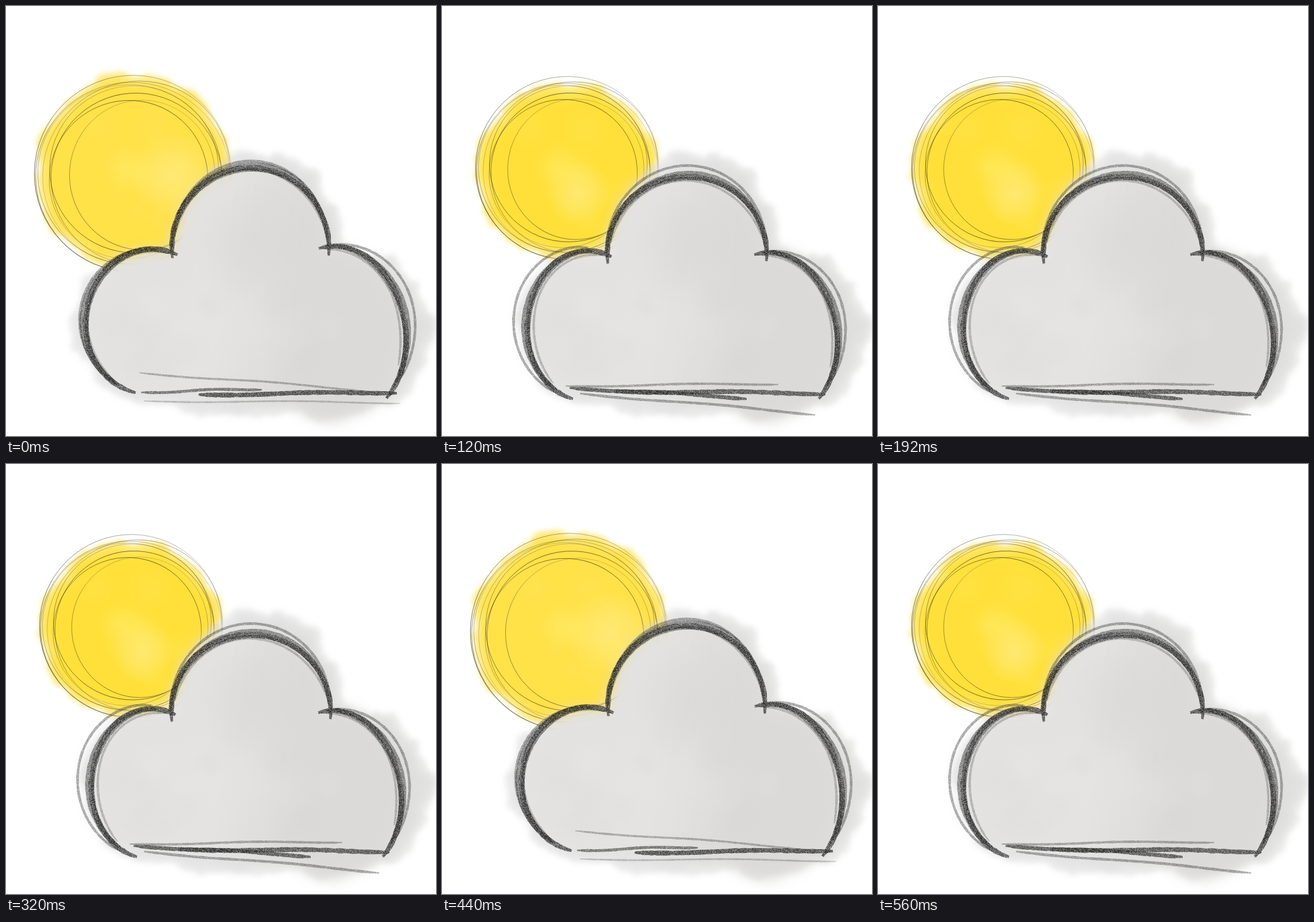
An HTML page with a canvas for the animation above (640 ms loop, 748 by 748 pixels).

```html
<!DOCTYPE html>
<html lang="en">
<head>
<meta charset="utf-8">
<title>Sun and cloud</title>
<style>
html, body { margin: 0; width: 100%; height: 100%; overflow: hidden; background: #fff; }
canvas { display: block; }
</style>
</head>
<body>
<canvas id="stage" width="748" height="748"></canvas>
<script>
const SIZE = 748, { PI, sin, cos, hypot, min, max } = Math;
let seed = 7;

function rand(lo = 0, hi = 1) {
  seed = (seed * 1664525 + 1013904223) >>> 0;
  return lo + (hi - lo) * seed / 4294967296;
}

function layer(size = SIZE) {
  const c = document.createElement('canvas');
  c.width = c.height = size;
  return c.getContext('2d');
}

// Points at(t) for t from 0 to 1.
const sample = (n, at) => Array.from({ length: n + 1 }, (_, i) => at(i / n));

function fillPath(g, pts) {
  g.beginPath();
  pts.forEach(([x, y]) => g.lineTo(x, y));
  g.closePath();
  g.fill();
}

// An ellipse with a ragged edge.
function blot(g, [cx, cy, rx, ry], grow, rough) {
  fillPath(g, sample(130, t => {
    const a = t * 2 * PI;
    const k = grow + rough * (rand(-.5, .5) + .4 * sin(a * 7 + cx) + .3 * sin(a * 13 + cy));
    return [cx + cos(a) * (rx + k), cy + sin(a) * (ry + k)];
  }));
}

function glow(g, x, y, r, rgb, a) {
  const fill = g.createRadialGradient(x, y, 0, x, y, r);
  fill.addColorStop(0, `rgba(${rgb},${a})`);
  fill.addColorStop(.5, `rgba(${rgb},${a * .6})`);
  fill.addColorStop(1, `rgba(${rgb},0)`);
  g.fillStyle = fill;
  g.fillRect(x - r, y - r, 2 * r, 2 * r);
}

function paintSun(g, { body, color, shine }) {
  g.save();
  g.fillStyle = color;
  for (const [grow, alpha, blur] of [[-1, .5, 4], [-8, .6, 7], [-18, 1, 8]]) {
    g.globalAlpha = alpha;
    g.filter = `blur(${blur}px)`;
    blot(g, body, grow, 9);
  }
  g.restore();
  glow(g, ...shine, '255,236,135', .7);
  for (let i = 0; i < 14; i++) {
    const a = rand(0, 2 * PI), r = rand(0, 100);
    glow(g, body[0] + cos(a) * r, body[1] + sin(a) * r, rand(20, 50), '255,236,110', .14);
  }
}

// Pencil circles that drift around the centre and fade along their way.
function paintRings(g, [cx, cy, inner, outer]) {
  const count = 8;
  for (let i = 0; i < count; i++) {
    const r = inner + (outer - inner) * (i / (count - 1)) ** .7;
    const a = i * 2.4, off = (outer - r) * .3 + 3;
    const x = cx + cos(a) * off, y = cy + sin(a) * off;
    const ink = g.createConicGradient(rand(0, 6), x, y), dark = rand(.4, .75);
    [dark, dark * .3, dark].forEach((v, k) => ink.addColorStop(k / 2, `rgba(40,36,20,${v})`));
    g.strokeStyle = ink;
    g.beginPath();
    g.ellipse(x, y, r + rand(-4, 4), r + rand(-4, 4), a, 0, 2 * PI);
    g.stroke();
  }
}

// Watercolour areas: dome, left, right, bottom.
const halo = [[442, 408, 140, 156], [257, 556, 144, 126], [580, 568, 162, 148], [435, 642, 270, 72]];
const fog = [[425, 425, 134, 142], [255, 552, 116, 124], [568, 572, 124, 146], [420, 580, 262, 106]];

function paintWash(g, areas, [left, right], grow, rough, blur, alpha) {
  const p = layer();
  p.fillStyle = p.createLinearGradient(100, 500, SIZE, 560);
  [left, left, right, right].forEach((c, i) => p.fillStyle.addColorStop([0, .42, .62, 1][i], c));
  areas.forEach(area => blot(p, area, grow, rough));
  g.save();
  g.globalAlpha = alpha;
  g.filter = `blur(${blur}px)`;
  g.drawImage(p.canvas, 0, 0);
  g.restore();
}

function paintCloud(g, inset) {
  const rims = halo.map(([x, y, rx, ry], i) =>
    i === 1 ? [x + inset / 2, y, rx - inset / 2, ry] : [x, y, rx, ry]);
  const pale = ['#d6d6d6', '#cfcfce'];
  paintWash(g, rims, pale, 0, 12, 5, .38);
  paintWash(g, rims, pale, -10, 14, 8, .42);
  paintWash(g, fog, ['#e3e2e1', '#dbdad8'], 2, 5, 12, 1);
  glow(g, 430, 410, 100, '215,214,212', .5);
  glow(g, 360, 560, 130, '230,229,228', .55);
  for (let i = 0; i < 24; i++) {
    glow(g, rand(190, 640), rand(470, 640), rand(20, 55),
      rand() < .5 ? '232,231,230' : '212,211,209', .14);
  }
}

const grain = (() => {
  const g = layer(256), img = g.createImageData(256, 256);
  for (let i = 3; i < img.data.length; i += 4) img.data[i] = 150 * rand() ** 2;
  g.putImageData(img, 0, 0);
  return g.canvas;
})();

// A charcoal mark of uneven width.
function mark(g, pts, width, alpha) {
  const left = [], right = [], last = pts.length - 1;
  pts.forEach(([x, y], i) => {
    const [x0, y0] = pts[max(0, i - 1)], [x1, y1] = pts[min(last, i + 1)];
    const half = width / 2 * min(1, .5 + min(i, last - i) / 8) * rand(.88, 1.12);
    const len = hypot(x1 - x0, y1 - y0) || 1;
    const nx = (y0 - y1) / len * half, ny = (x1 - x0) / len * half;
    left.push([x + nx, y + ny]);
    right.unshift([x - nx, y - ny]);
  });
  g.fillStyle = `rgba(30,30,30,${alpha})`;
  fillPath(g, left.concat(right));
}

// Repeated passes over one lobe; "stray" is how far the loosest one swings out.
function sketchLobe(g, [cx, cy, rx, ry, stray], [from, to]) {
  const passes = [[9, .74, 0], [6, .55, -4], [6, .5, 5], [4.5, .42, stray], [4, .28, -stray * .6]];
  passes.forEach(([width, alpha, swing], i) => {
    const start = i ? rand(0, .12) : 0, end = i ? rand(.82, 1) : 1;
    mark(g, sample(70, t => {
      const u = start + (end - start) * t, a = PI * (from + (to - from) * u);
      const k = swing * sin(PI * u) + 1.5 * sin(u * 9 + i);
      return [cx + cos(a) * (rx + k), cy + sin(a) * (ry + k)];
    }), width, alpha);
  });
}

function sketchLine(g, [x0, y0, x1, y1, width, alpha]) {
  mark(g, sample(70, t => [x0 + (x1 - x0) * t, y0 + (y1 - y0) * t + 1.5 * sin(t * 8)]), width, alpha);
}

// Angles in units of PI: dome, left, right.
const sweeps = [[-1.03, .02], [-.38, -1.42], [-.56, .24]];

function pose({ sun, rings, inset, lobes, base }) {
  seed = 41;
  const g = layer(), p = layer();
  g.fillStyle = '#fff';
  g.fillRect(0, 0, SIZE, SIZE);
  paintSun(g, sun);
  paintRings(g, rings);
  paintCloud(g, inset);
  p.filter = 'blur(.6px)';
  lobes.forEach((lobe, i) => sketchLobe(p, lobe, sweeps[i]));
  base.forEach(line => sketchLine(p, line));
  p.filter = 'none';
  p.globalCompositeOperation = 'destination-out';
  p.fillStyle = p.createPattern(grain, 'repeat');
  p.fillRect(0, 0, SIZE, SIZE);
  g.drawImage(p.canvas, 0, 0);
  return g.canvas;
}

const wide = pose({
  sun: { body: [222, 289, 170, 173], color: '#ffe148', shine: [292, 295, 75] },
  rings: [222, 294, 130, 170],
  inset: 0,
  lobes: [[425, 425, 136, 145, 9], [255, 550, 118, 126, 8], [568, 575, 128, 156, 18]],
  base: [[235, 672, 445, 666, 5, .6], [335, 676, 680, 672, 8, .78],
    [232, 638, 620, 668, 3.5, .35], [240, 687, 686, 690, 3, .28]]
});
const low = pose({
  sun: { body: [217, 288, 159, 155], color: '#ffe03a', shine: [238, 326, 55] },
  rings: [219, 284, 122, 158],
  inset: 20,
  lobes: [[426, 435, 138, 140, 16], [255, 557, 108, 130, -22], [566, 580, 122, 150, 16]]
    .map(([x, y, rx, ry, stray]) => [x, y, rx, ry, Math.abs(stray)]),
  base: [[222, 664, 530, 682, 7, .72], [300, 670, 667, 674, 8, .72],
    [215, 661, 585, 657, 4, .38], [240, 674, 649, 710, 4.5, .42]]
});
const loose = pose({
  sun: { body: [211, 273, 160, 162], color: '#ffde2e', shine: [213, 285, 65] },
  rings: [206, 274, 108, 146],
  inset: 0,
  lobes: [[424, 430, 135, 141, 20], [250, 551, 117, 122, 10], [566, 575, 126, 156, 28]],
  base: [[190, 676, 663, 683, 6, .65], [430, 681, 667, 668, 10, .55],
    [340, 680, 615, 704, 3, .4]]
});

const beats = [[120, wide], [240, low], [320, loose], [440, low], [560, wide], [640, low]];
const stage = document.getElementById('stage').getContext('2d');
const start = performance.now();

function draw() {
  const t = (performance.now() - start) % 640;
  stage.drawImage(beats.find(([end]) => t < end)[1], 0, 0);
  requestAnimationFrame(draw);
}
draw();
</script>
</body>
</html>
```
